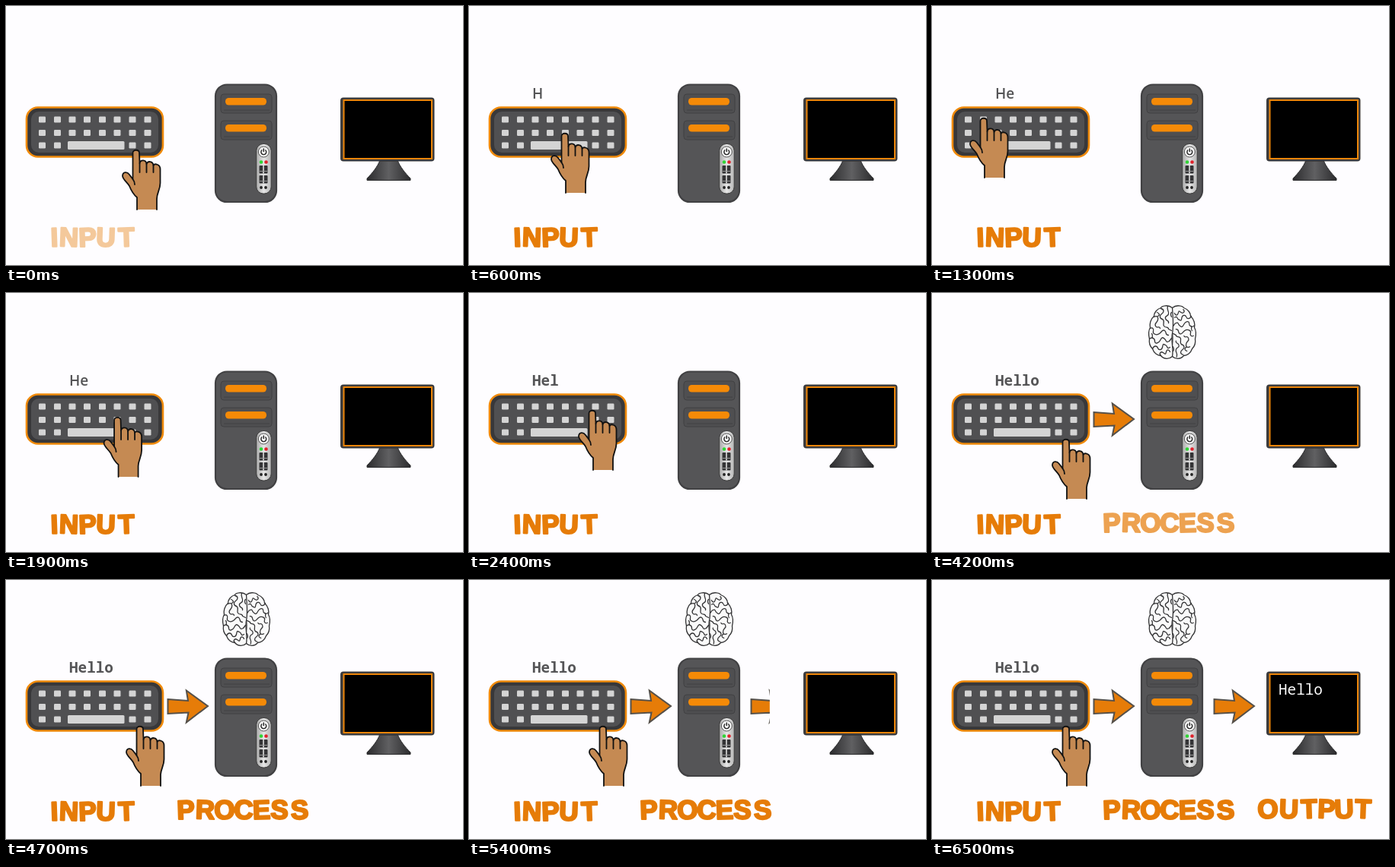
Animation, 600 px wide and 341 px high, one loop 6900 ms. Source, as an HTML page:

```html
<!DOCTYPE html>
<html lang="en">
<head>
<meta charset="utf-8">
<title>Input, process, output</title>
<style>
  html, body { margin: 0; width: 100%; height: 100%; overflow: hidden; background: #fefdff; }
  svg { display: block; width: 100vw; height: 100vh; }
  .word { font: bold 35px "Liberation Sans", Arial, sans-serif; fill: #e67c08; stroke: #e67c08; stroke-width: 2.4; stroke-linejoin: round; text-anchor: middle; }
  .mono { font: 600 19.3px "Noto Sans Mono", "DejaVu Sans Mono", monospace; }
  .sans { font: 600 19px "Open Sans", "Noto Sans", sans-serif; }
</style>
</head>
<body>
<svg viewBox="0 0 600 341">
  <defs>
    <linearGradient id="stand" x2="1"><stop stop-color="#2c2c2e"/><stop offset=".5" stop-color="#606062"/><stop offset="1" stop-color="#2c2c2e"/></linearGradient>
    <linearGradient id="panel" x2="1"><stop stop-color="#aaa"/><stop offset=".5" stop-color="#e6e6e6"/><stop offset="1" stop-color="#b4b4b4"/></linearGradient>
    <path id="arrow" d="M212.500 157L239 159L236.800 145.500L265 166L236.800 187.500L239.500 174.500L212.500 176Z" fill="#e67c08" stroke="#55504a" stroke-width="2"/>
    <clipPath id="clip1"><rect id="wipe1" x="210" y="140" height="55"/></clipPath>
    <clipPath id="clip2"><rect id="wipe2" x="368" y="140" height="55"/></clipPath>
    <g id="slot">
      <rect x="282" y="116" width="67" height="25" rx="4" fill="#4f4f51" stroke="#414143"/>
      <rect x="288" y="121" width="54" height="9.500" rx="4.500" fill="#f58a07"/>
      <path d="M286 137H346" stroke="#414143"/>
    </g>
    <g id="usb">
      <rect x="332.500" y="210" width="11" height="10.500" rx="1" fill="#343436"/>
      <path d="M338 210V220.500" stroke="#ddd" stroke-width="1.600"/>
      <path d="M333 217.500H343" stroke="#999"/>
    </g>
    <path id="lobe" fill="#fafafa" d="M0-32C-6-37-14-34-15-32C-21-30-24-25-24-21C-29-17-30-10-29-6C-32-1-31 5-30 9C-31 15-28 20-26 22C-24 28-19 31-15 31C-11 36-4 36 0 32C2 22-2 12 0 2S1-20 0-32Z"/>
    <g id="folds" fill="none">
      <path d="M-15-31C-10-30-11-26-14-24S-17-18-13-17M-6-34C-8-29-4-28-5-24S-10-22-9-18-4-16-5-12M-1-26C-3-24-2-22-1-20"/>
      <path d="M-24-20C-20-22-18-20-19-16S-24-12-22-8-17-9-16-5M-13-17C-9-15-13-11-11-8S-5-8-5-4L-1-2"/>
      <path d="M-29-5C-26-7-24-4-25-1S-21 5-17 2-13-4-10-2-10 4-5 4"/>
      <path d="M-30 9C-27 6-23 8-23 12S-18 15-16 11-13 6-10 9-9 14-4 12L-1 8"/>
      <path d="M-26 22C-24 17-20 18-19 21S-14 24-13 20-13 15-9 17-8 23-3 20"/>
      <path d="M-15 31C-18 28-15 25-12 27S-9 30-8 26-4 23-3 26M-20-26C-17-25-16-22-19-21M-27 2C-25 4-27 6-26 8"/>
    </g>
  </defs>

  <rect x="27" y="133.500" width="179" height="65" rx="15" fill="#38383a" stroke="#f08a0a" stroke-width="2.600"/>
  <rect x="33" y="139" width="167" height="54" rx="10" fill="#505052"/>
  <g id="keys" fill="#d4d4d4"><rect x="81" y="178" width="74.500" height="11" rx="1.500"/></g>

  <rect x="275" y="103.500" width="80" height="154.500" rx="15" fill="#555557" stroke="#414143" stroke-width="2.200"/>
  <use href="#slot"/><use href="#slot" y="35"/>
  <rect x="328.700" y="181.500" width="19.500" height="65.500" rx="9" fill="url(#panel)" stroke="#3a3a3a"/>
  <circle cx="338.300" cy="192" r="7" fill="#f4f4f4" stroke="#555"/>
  <path d="M336.300 189.500A3.400 3.400 0 1 0 340.300 189.500M338.300 187.500V192" fill="none" stroke="#222" stroke-width="1.400"/>
  <circle cx="335" cy="205.500" r="2.300" fill="#2fd535"/><circle cx="341.500" cy="205.500" r="2.300" fill="#e0222c"/>
  <use href="#usb"/><use href="#usb" y="13"/>
  <circle cx="335" cy="239" r="1.900" fill="#222"/><circle cx="341" cy="239" r="1.900" fill="#222"/>

  <path d="M490.500 204H514.500C517 211 524 220 531 227V229.500H474V227C481 220 488 211 490.500 204Z" fill="url(#stand)" stroke="#2c2c2e"/>
  <rect x="439" y="120.500" width="123.500" height="84" rx="4" fill="#3b3b3d"/>
  <rect x="443.500" y="124" width="115.500" height="77" fill="#000" stroke="#ee860a" stroke-width="2"/>

  <g id="brain" transform="translate(315.500 51.500)" stroke="#333335" stroke-width="1.300" stroke-linecap="round" stroke-linejoin="round">
    <use href="#lobe" transform="scale(-1 1)"/><use href="#lobe"/>
    <use href="#folds"/><use href="#folds" transform="rotate(180) scale(.96)"/>
  </g>
  <g clip-path="url(#clip1)"><use href="#arrow"/></g>
  <g clip-path="url(#clip2)"><use href="#arrow" x="158"/></g>
  <g id="words"></g>
  <text id="typed" x="83" y="122" fill="#555557"></text>
  <text id="shown" class="mono" x="455" y="151" fill="#fff" style="font-weight:400">Hello</text>

  <g id="hand" stroke="#111" stroke-width="1.800" stroke-linecap="round" stroke-linejoin="round">
    <path d="M1 79V63C-4 59-7 53-9 48C-12 43-18 39-18 34.500C-17.500 29-12 29-9 33L-4.500 39V4.500C-4.500-.5 4-.5 4 4.500L4.500 18C5.500 13 13 13 13.500 19C15 14.500 22 15 22.500 21C24 18 31.500 19 31.500 26V44C31.500 53 27 57 27 65V79" fill="#c58a53"/>
    <path d="M4.500 18V30M13.500 19V30M22.500 21V30M-4.500 39C-3 41-2 43-2 46" fill="none"/>
  </g>
</svg>
<script>
const el = id => document.getElementById(id);
const NS = "http://www.w3.org/2000/svg";
function add(parent, tag, attrs, text = "") {
  const node = parent.appendChild(document.createElementNS(NS, tag));
  for (const name in attrs) node.setAttribute(name, attrs[name]);
  node.textContent = text;
  return node;
}

const columns = [47.5, 67.5, 87, 106.5, 126.5, 146, 166, 186];
[149.5, 167, 183.5].forEach((y, row) => columns.forEach((x, i) => {
  if (row < 2 || i < 2 || i > 5)
    add(el("keys"), "rect", { x: x - 4.5, y: y - 4, width: 9, height: 8, rx: 1.2 });
}));

// Each letter has its own centre and a slight alternating tilt.
function word(text, y, centres) {
  const group = add(el("words"), "g", { class: "word" });
  centres.forEach((x, i) => add(group, "text",
    { x, y, transform: `rotate(${i % 2 ? 2 : -2} ${x} ${y - 12})` }, text[i]));
  return group;
}
const input = word("INPUT", 316.5, [63.5, 82.5, 107, 131, 158]);
const process = word("PROCESS", 314.5, [236, 261.5, 287, 312, 335.5, 359, 385.5]);
const output = word("OUTPUT", 313.5, [441, 468.5, 495, 518, 541, 566]);

// Fingertip stops: time, x, y
const stops = [
  [0, 171, 189], [500, 126, 167], [700, 126, 167], [1100, 68, 147], [1400, 68, 147],
  [2100, 166, 167], [2200, 166, 167], [2400, 162, 154], [2600, 166, 167], [2800, 166, 167],
  [3000, 165, 148], [3200, 165, 148], [3500, 176, 192], [6900, 176, 192]
];
const strokes = [600, 1200, 2200, 2700, 3100];

const ramp = (t, from, to) => Math.min(1, Math.max(0, (t - from) / (to - from)));
const fade = (node, amount) => node.setAttribute("opacity", amount);

function draw(t) {
  const i = stops.findIndex((stop, n) => n && t < stop[0]);
  const [t0, x0, y0] = stops[i - 1], [t1, x1, y1] = stops[i];
  const k = ramp(t, t0, t1), e = k * k * (3 - 2 * k);
  el("hand").setAttribute("transform", `translate(${x0 + (x1 - x0) * e} ${y0 + (y1 - y0) * e})`);

  const count = strokes.filter(s => t >= s).length;
  el("typed").textContent = "Hello".slice(0, count);
  el("typed").setAttribute("class", count < 3 ? "sans" : "mono");

  fade(input, ramp(t, -200, 300));
  fade(process, ramp(t, 3850, 4350));
  fade(output, ramp(t, 6000, 6500));
  fade(el("brain"), ramp(t, 3600, 4200));
  fade(el("shown"), ramp(t, 5700, 6000));
  el("wipe1").setAttribute("width", 58 * ramp(t, 3530, 4200));
  el("wipe2").setAttribute("width", 58 * ramp(t, 5090, 5760));
}

function frame(now) {
  draw(Math.min(6500, Math.floor(now % 6900 / 100) * 100));
  requestAnimationFrame(frame);
}
frame(performance.now());
</script>
</body>
</html>
```
